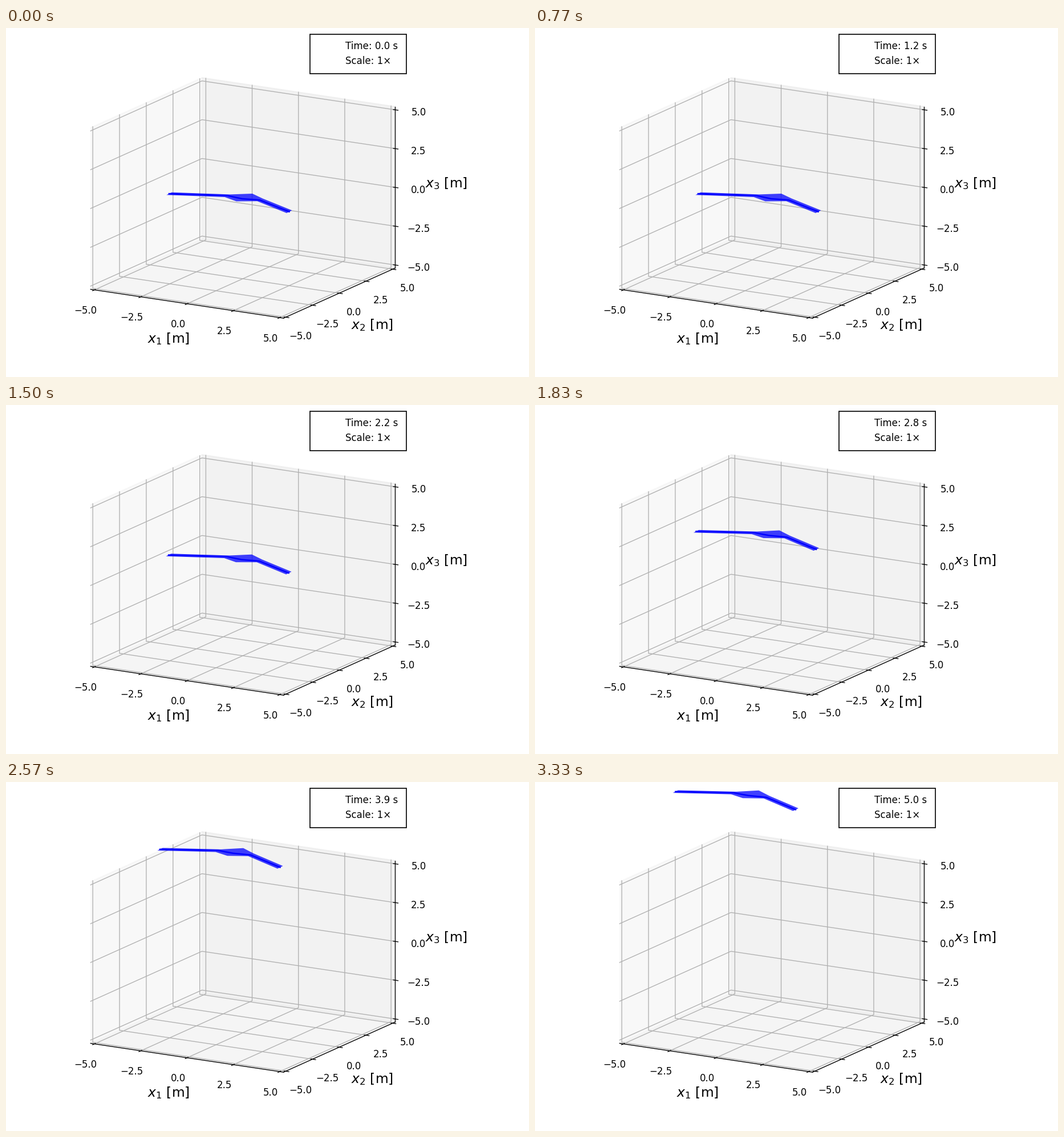
Recreate the animation shown at these times as a matplotlib script. Size 917 by 611 pixels, loop 3.36 s.

```python
import numpy as np
import matplotlib.pyplot as plt
from matplotlib.animation import FuncAnimation
from matplotlib.patches import Polygon, Rectangle

W, H = 917, 611
FRAMES, LOOP_MS, DT = 101, 3360, 0.05
PT = 0.72  # points per pixel at 100 dpi

plt.rcParams["font.family"] = "DejaVu Sans"
fig = plt.figure(figsize=(W / 100, H / 100), dpi=100, facecolor="white")
ax = fig.add_axes([0, 0, 1, 1])
ax.set_xlim(0, W)
ax.set_ylim(H, 0)
ax.axis("off")

# Orthographic view of the box: elevation 15, azimuth -60, aspect 4:4:3
SCALE, CENTER = 37.5, np.array([415.1, 297.5])
ELEV, AZIM = np.radians(15), np.radians(60)
LIM = 5 * (1 + 1 / 24)
TICKS = (-5.0, -2.5, 0.0, 2.5, 5.0)


def project(x, y, z):
    u = x * np.sin(AZIM) + y * np.cos(AZIM)
    v = (x * np.cos(AZIM) - y * np.sin(AZIM)) * np.sin(ELEV)
    return CENTER + SCALE * np.array([u, v - 0.75 * z * np.cos(ELEV)])


def path(*points):
    return np.array([project(*p) for p in points])


def line(points, color, width=4 / 3, zorder=2):
    return ax.plot(*points.T, color=color, lw=width * PT, zorder=zorder)[0]


def text(x, y, s, px=50 / 3, ha="center", zorder=4):
    return ax.text(x, y, s, fontsize=px * PT, ha=ha, va="baseline", zorder=zorder)


def draw_box():
    a, b = -LIM, LIM
    panes = [
        (0.95, [(a, a, a), (a, b, a), (a, b, b), (a, a, b)]),
        (0.90, [(a, b, a), (b, b, a), (b, b, b), (a, b, b)]),
        (0.925, [(a, a, a), (b, a, a), (b, b, a), (a, b, a)]),
    ]
    for gray, corners in panes:
        ax.add_patch(Polygon(path(*corners), closed=False, color=(gray,) * 3,
                             alpha=0.5, lw=5 / 3 * PT, zorder=1))

    for t in TICKS:
        line(path((t, a, a), (t, b, a), (t, b, b)), "#b0b0b0")
        line(path((b, t, a), (a, t, a), (a, t, b)), "#b0b0b0")
        line(path((b, b, t), (a, b, t), (a, a, t)), "#b0b0b0")

    for ends in ([(a, a, a), (b, a, a)], [(b, a, a), (b, b, a)], [(b, b, a), (b, b, b)]):
        line(path(*ends), "black", zorder=3)

    out, inn = 0.17, 0.085
    for t in TICKS:
        line(path((t, a - out, a), (t, a + inn, a)), "black", zorder=3)
        line(path((b + out, t, a), (b - inn, t, a)), "black", zorder=3)
        line(path((b + out, b, t), (b - inn, b, t)), "black", zorder=3)
        label = f"{t:.1f}".replace("-", "\u2212")
        spots = (((t, a, a), (-15.5, 41.5)), ((b, t, a), (26.2, 39)), ((b, b, t), (41.5, 10.2)))
        for point, offset in spots:
            text(*(project(*point) + offset), label)

    for i, (x, y) in enumerate([(285, 551.5), (641.5, 527), (772, 279.5)], 1):
        text(x, y, f"$x_{i}$ [m]", px=70 / 3)


draw_box()

# Wing sections from left tip to right tip
FRONT = np.array([(281.3, 292.3), (383.5, 296), (404, 303.5), (440.5, 303.2), (492, 324)])
BACK = np.array([(290.5, 287.7), (393, 291.4), (432, 290), (450, 298.5), (501.5, 319.3)])
SPAR = np.array([(286, 290.1), (388, 293.4), (414, 299), (445, 301.2), (496.5, 321.6)])
FLEX = np.array([0, 0.6, 1, 0.6, 0])

# Drift of the wing in pixels, at even times from START on
START, STEP = 1.2, 0.4
RISE = np.array([0, 2.2, 13.5, 38, 73.5, 111, 149, 186, 221.5, 256, 290.5])
DRIFT = np.array([0, 0, 0.4, 1.4, 3.8, 7.3, 12.2, 18.5, 26.4, 35, 44.3])


def smooth(values, t):
    """Cubic Hermite curve through evenly spaced values."""
    s = max(0.0, (t - START) / STEP)
    i = min(int(s), len(values) - 2)
    u = s - i
    slope = np.gradient(values)
    slope[0] = 0
    return (values[i] * (1 + 2 * u) * (1 - u) ** 2 + slope[i] * u * (1 - u) ** 2
            + values[i + 1] * u * u * (3 - 2 * u) + slope[i + 1] * u * u * (u - 1))


skin = ax.add_patch(Polygon(np.vstack([FRONT, BACK[::-1]]), facecolor="blue",
                            edgecolor="none", alpha=0.75, zorder=5))
spar = line(SPAR, "blue", width=2.5, zorder=6)

RIGHT, TOP, BOTTOM = 701.8, 10.8, 79.8
frame_box = ax.add_patch(Rectangle((533.2, TOP), RIGHT - 533.2, BOTTOM - TOP, facecolor="white",
                                   edgecolor="black", lw=5 / 3 * PT, zorder=7))
clock = text(595, 37.3, "", ha="left", zorder=8)
scale = text(595, 63, "Scale: 1\u00d7", ha="left", zorder=8)


def update(k):
    t = k * DT
    rise = smooth(RISE, t)
    shift = np.zeros_like(SPAR)
    shift[:, 0] = -smooth(DRIFT, t)
    shift[:, 1] = -rise - 2 * np.tanh(rise / 60) * FLEX
    skin.set_xy(np.vstack([FRONT + shift, (BACK + shift)[::-1]]))
    spar.set_data(*(SPAR + shift).T)

    # Two significant digits; the box grows leftward for longer text
    value = f"{t:.2}"
    extra = 10.6 * (len(value) - 3)
    clock.set_text(f"Time: {value} s")
    for label in (clock, scale):
        label.set_x(595 - extra)
    frame_box.set_x(533.2 - extra)
    frame_box.set_width(RIGHT - 533.2 + extra)
    return skin, spar, frame_box, clock, scale


anim = FuncAnimation(fig, update, frames=FRAMES, interval=LOOP_MS / FRAMES,
                     repeat=True, repeat_delay=0, blit=False)
plt.show()
```
